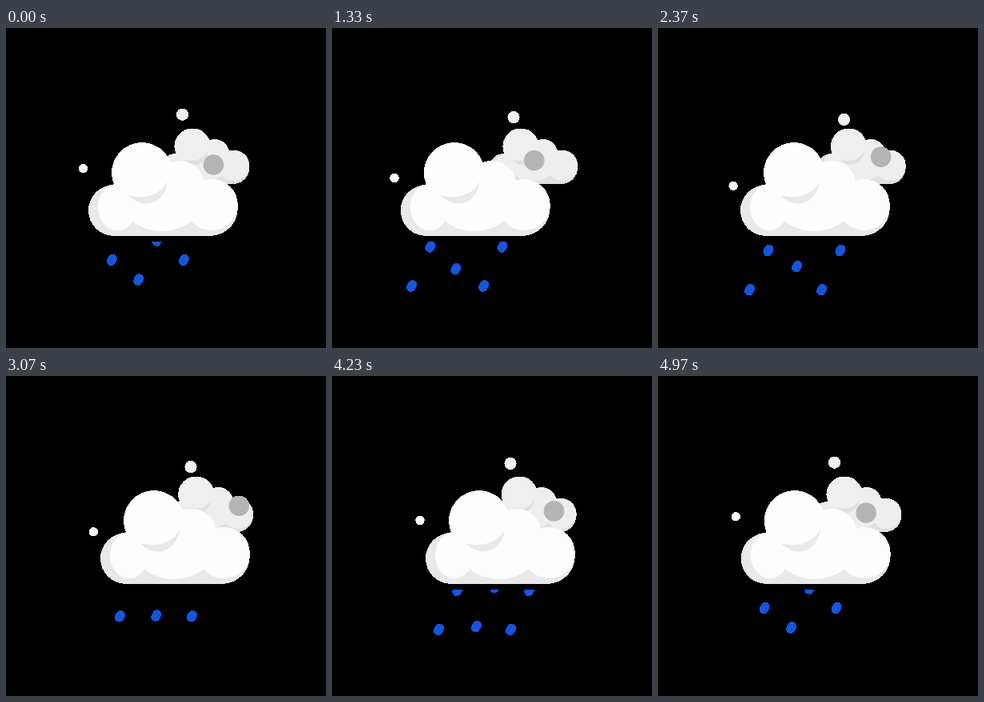
Write an HTML page with a canvas that moves like this. It is 400x400 px and loops after 5.01 s.

```html
<!DOCTYPE html>
<html lang="en">
<head>
<meta charset="utf-8">
<title>Rain cloud</title>
<style>
  html, body { margin: 0; width: 100%; height: 100%; overflow: hidden; background: #000; }
  canvas { display: block; width: 400px; height: 400px; }
</style>
</head>
<body>
<canvas id="stage" width="400" height="400"></canvas>
<script>
const ctx = document.getElementById('stage').getContext('2d', { willReadFrequently: true });
const LOOP = 5010;    // playback length, ms
const PERIOD = 5000;  // motion length, ms
const RAIN = 4960;    // rain pattern length, ms

// Sideways drift of the large cloud: [time, offset]
const DRIFT = [
  [0, 0], [560, -9.2], [1080, -15.8], [1340, -17.2], [1660, -15.6], [2000, -8.8],
  [2360, 0], [2710, 7.6], [3080, 15], [3640, 19.4], [4240, 14], [4840, 3.3]
];

// Periodic cubic through the drift points
function drift(t) {
  const n = DRIFT.length;
  const at = i => {
    const [pt, pv] = DRIFT[(i + n) % n];
    return [pt + Math.floor(i / n) * PERIOD, pv];
  };
  let i = n - 1;
  while (DRIFT[i][0] > t) i--;
  const [a, b, c, d] = [at(i - 1), at(i), at(i + 1), at(i + 2)];
  const h = c[0] - b[0];
  const u = (t - b[0]) / h;
  const m0 = (c[1] - a[1]) / (c[0] - a[0]) * h;
  const m1 = (d[1] - b[1]) / (d[0] - b[0]) * h;
  return b[1] + u * (m0 + u * (3 * (c[1] - b[1]) - 2 * m0 - m1
    + u * (2 * (b[1] - c[1]) + m0 + m1)));
}

function oval(x, y, rx, ry, color) {
  ctx.fillStyle = color;
  ctx.beginPath();
  ctx.ellipse(x, y, rx, ry, 0, 0, Math.PI * 2);
  ctx.fill();
}

const disc = (x, y, r, color) => oval(x, y, r, r, color);

function cloud(x, y, scale, light, head, shade) {
  ctx.save();
  ctx.translate(x, y);
  ctx.scale(scale, scale);
  // shaded base
  disc(135, 228, 32, shade);
  disc(254.8, 225, 35, shade);
  ctx.fillRect(135, 205, 120, 55);
  // lit lobes
  oval(139, 224, 24, 29, light);
  oval(257.3, 221, 32.5, 32, light);
  disc(217, 197, 31, light);
  oval(195, 216, 50, 38, light);
  disc(170, 181, 38, head);
  // shadow under the head
  ctx.fillStyle = shade;
  ctx.beginPath();
  ctx.moveTo(153, 209);
  ctx.bezierCurveTo(169, 213, 190, 212, 202, 192.5);
  ctx.bezierCurveTo(199, 217, 173, 230, 153, 209);
  ctx.fill();
  ctx.restore();
}

// A column of drops 49 px apart, sliding down a slanted track
function column(x, startY, cycles, t) {
  const gap = 49, end = 337;
  let y = startY + (t / RAIN * cycles % 1) * gap;
  while (y + gap <= end) y += gap;
  while (y > end) y -= gap;
  for (; y > 255; y -= gap) {
    const cx = x - 0.475 * (y - 290);
    ctx.beginPath();
    ctx.moveTo(cx + 0.9, y - 1.6);
    ctx.lineTo(cx - 0.9, y + 1.6);
    ctx.stroke();
  }
}

function rain(dx, t) {
  ctx.save();
  ctx.beginPath();
  ctx.rect(0, 267, 400, 133);
  ctx.clip();
  ctx.strokeStyle = '#1456e0';
  ctx.lineWidth = 11.3;
  ctx.lineCap = 'round';
  column(dx + 132.3, 290, 10, t);
  column(dx + 177.4, 314.6, 14, t);
  column(dx + 222.3, 290, 10, t);
  ctx.restore();
}

// Turns soft outlines into hard pixel edges
function harden() {
  const image = ctx.getImageData(0, 0, 400, 400);
  const data = image.data;
  for (let i = 3; i < data.length; i += 4) data[i] = data[i] < 128 ? 0 : 255;
  ctx.putImageData(image, 0, 0);
}

function draw(t) {
  const dx = drift(t);
  const c = Math.cos(t / PERIOD * Math.PI * 2);
  ctx.clearRect(0, 0, 400, 400);
  disc(226.5 - 6 * c, 111.3 - 3.2 * c, 7.6, '#efefef');
  cloud(134.6 - 2.7 * c, 40.3, 0.595, '#eeeeee', '#efefef', '#e0e0e0');
  disc(269.1 + dx - 9.7 * c, 166 + 5 * c, 12.8, '#b4b4b4');
  rain(dx, t);
  cloud(dx, 0, 1, '#fdfdfd', '#fefefe', '#e9e9e9');
  disc(95.3 + dx + 1.2 * c, 186.6 - 10.8 * c, 5.7, '#fafafa');
  harden();
}

// Motion runs at 25 poses a second, shown on a 30 Hz grid
function pose(ms) {
  const slot = Math.min(149, Math.floor((ms + 5) * 0.03));
  return Math.max(0, Math.ceil(slot * 5 / 6 - 0.501)) * 40;
}

const begin = performance.now();
let shown = -1;
function tick() {
  const t = pose((performance.now() - begin) % LOOP);
  if (t !== shown) draw(shown = t);
  requestAnimationFrame(tick);
}
tick();
</script>
</body>
</html>
```
